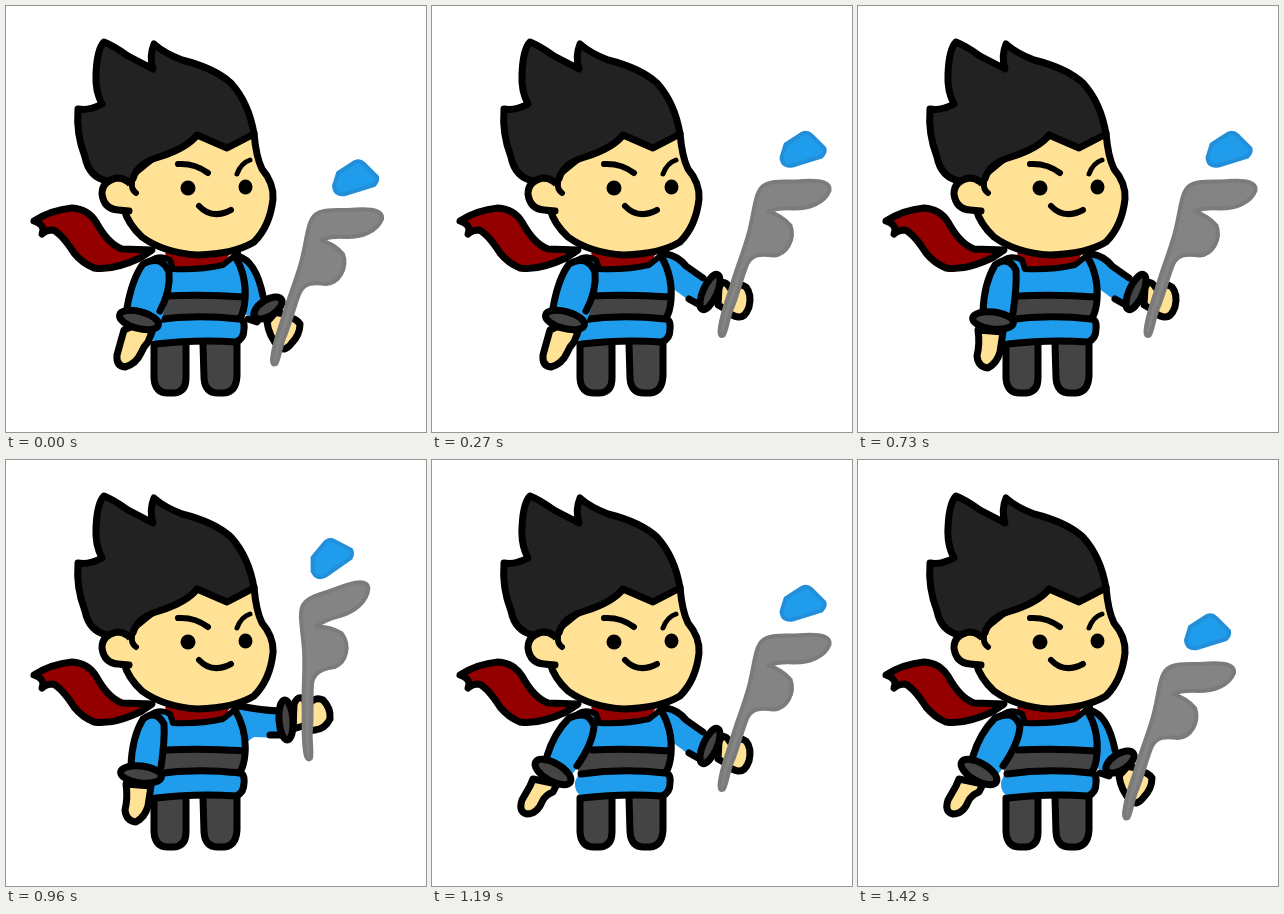
Write an HTML page that moves like this. It is 420 px wide and 426 px high and loops after 1.69 s.

```html
<!DOCTYPE html>
<html lang="en">
<head>
<meta charset="utf-8">
<title>Hero with a staff</title>
<style>
html, body { margin: 0; width: 100%; height: 100%; overflow: hidden; background: #fff; }
svg { display: block; width: 420px; height: 426px; }
.ink { stroke: #000; stroke-width: 7; stroke-linecap: round; stroke-linejoin: round; }
.line { fill: none; }
.skin { fill: #ffe296; }
.blue { fill: #209cec; }
.dark { fill: #444; }
.hair { fill: #222; }
.red { fill: #940000; }
.bare { stroke: none; }
.pose { visibility: hidden; }
.staff { fill: #848484; stroke: #7b7b7b; stroke-width: 4; stroke-linejoin: round; }
.gem { fill: #209cec; stroke: #218fd9; stroke-width: 4; stroke-linejoin: round; }
</style>
</head>
<body>
<svg viewBox="0 0 420 426">
  <defs>
    <g id="weapon">
      <path class="staff" d="M266 354C267 338 276 317 279 305C285 285 294 264 297 248C301 231 302 215 309 209C316 203 330 204 340 204C355 203 378 201 376 213C371 226 355 231 341 231Q324 230 315 234Q328 238 337 248C342 262 333 277 320 278C307 276 299 277 294 286C288 300 284 319 278 332C274 343 273 354 270 358Q266 360 266 354Z"/>
      <path class="gem" d="M328 180L332 167L349 156Q354 154 358 158L371 171Q372 175 368 179L339 188Q329 190 328 180Z"/>
    </g>
  </defs>

  <g id="right">
    <g class="pose">
      <path class="blue bare" d="M227 250L238 252Q251 264 258 290L246 311L233 306Z"/>
      <path class="ink line" d="M232 250Q250 255 257 290M242 313L251 316"/>
      <path class="ink skin" d="M261 316Q263 331 273 341Q279 346 285 338Q294 329 294 318Q290 312 281 311Q276 306 269 307Z"/>
      <ellipse class="ink dark" cx="262" cy="302" rx="16" ry="8" transform="rotate(-33 262 302)"/>
      <use href="#weapon"/>
    </g>
    <g class="pose">
      <path class="blue bare" d="M228 250L240 251L272 272L267 299L255 293L240 282Z"/>
      <path class="ink line" d="M234 248Q246 250 254 260L271 272M257 293L266 298"/>
      <path class="ink skin" d="M287 282Q291 271 298 282Q307 276 314 281Q320 288 317 301Q313 312 306 311Q299 310 295 304L286 299Z"/>
      <ellipse class="ink dark" cx="278" cy="286" rx="19" ry="7" transform="rotate(-66 278 286)"/>
      <use href="#weapon" transform="translate(21.5 -28.5)"/>
    </g>
    <g class="pose">
      <path class="blue bare" d="M228 247L245 249L276 252L274 278L248 277L238 284Z"/>
      <path class="ink line" d="M234 246Q252 250 274 251M264 275L273 275"/>
      <path class="ink skin" d="M288 244Q294 231 302 245Q309 236 317 240Q325 248 324 259Q319 269 309 270Q301 271 297 266L287 269Z"/>
      <ellipse class="ink dark" cx="280" cy="260" rx="7" ry="20" transform="rotate(-4 280 260)"/>
      <use href="#weapon" transform="translate(35 -59) rotate(-17.5 268 358)"/>
    </g>
  </g>

  <g id="body">
    <path class="ink dark" d="M148 338L148 372Q149 387 162 387L168 387Q180 386 180 372L180 338"/>
    <path class="ink dark" d="M197 338L198 372Q199 387 212 387L218 387Q230 386 231 370L231 338"/>
    <path class="blue bare" d="M150 252H228Q240 275 239 298L236 334L151 337Q142 333 143 322L147 313L150 290Z"/>
    <path class="dark bare" d="M147 291H239V302L235 312L146 314Z"/>
    <path class="ink line" d="M160 290Q198 288 238 291M149 314Q190 308 233 313Q239 313 238 323Q238 333 230 336Q192 333 150 338M229 250Q241 270 239 294Q238 306 234 312"/>
    <path class="red bare" d="M159 247H224L218 259L166 264Z"/>
    <path class="ink line" style="stroke-width:6" d="M144 255Q154 248 164 254L167 263Q196 264 217 259L232 247"/>
  </g>

  <g id="left">
    <g class="pose">
      <path class="ink skin" d="M118 324Q114 338 111 349Q110 360 119 361Q130 358 135 347Q138 340 142 336L146 326L133 317Z"/>
      <path class="blue bare" d="M121 305Q126 275 137 258Q157 247 163 269Q165 290 154 317Z"/>
      <path class="ink line" d="M121 302Q126 273 137 258Q155 248 163 266Q165 284 154 305"/>
      <ellipse class="ink dark" cx="133" cy="314" rx="20" ry="8.5" transform="rotate(15 133 314)"/>
    </g>
    <g class="pose">
      <path class="ink skin" d="M120 324Q122 338 119 350Q120 361 130 362Q139 357 142 346L145 326Z"/>
      <path class="blue bare" d="M125 309Q126 280 136 261Q149 247 158 264Q159 285 156 315Z"/>
      <path class="ink line" d="M125 306Q126 277 137 259Q150 249 158 264Q159 280 155 307"/>
      <ellipse class="ink dark" cx="135" cy="314.5" rx="20.5" ry="8.5" transform="rotate(7 135 314.5)"/>
    </g>
    <g class="pose">
      <path class="ink skin" d="M101 319L98 326L90 340Q86 352 95 354Q105 354 110 342Q113 335 121 332L125 324Z"/>
      <path class="blue bare" d="M112 300Q122 271 137 258Q158 249 162 270Q161 289 138 317Z"/>
      <path class="ink line" d="M115 296Q122 273 137 258Q156 249 162 266Q161 283 145 306"/>
      <ellipse class="ink dark" cx="121" cy="312" rx="20" ry="9" transform="rotate(30 121 312)"/>
    </g>
  </g>

  <path id="scarf" class="ink red" d="M28 215Q45 204 66 202Q82 203 90 216Q102 238 116 243L146 244L134 252Q106 265 88 262Q76 257 68 247Q56 228 47 224Q40 224 36 228Q40 219 28 215Z"/>

  <g id="head">
    <path class="ink skin" d="M248 127Q250 151 256 163Q268 177 267 193Q264 220 248 236Q228 248 192 249Q158 247 136 231Q122 218 118 203L125 170L180 125Z"/>
    <path class="ink hair" d="M101 175Q83 171 79 151Q70 128 72 103Q83 105 96 98Q89 85 90 68Q91 43 98 36Q108 40 122 50L147 63Q143 50 148 38Q158 47 176 54Q208 62 225 77Q243 97 248 128L221 142L191 129Q181 142 153 151Q128 158 126 178Z"/>
    <path class="ink skin" d="M129 187Q124 172 111 172Q96 175 96 188Q98 203 112 204L123 205"/>
    <path class="skin bare" d="M119 182L133 173L140 205L124 200Z"/>
    <path class="ink line" style="stroke-width:6" d="M126 177Q125 183 130 187M116 205H123"/>
    <ellipse cx="182" cy="182" rx="7.5" ry="7.5"/>
    <ellipse cx="239.5" cy="181" rx="7" ry="7.5"/>
    <path class="ink line" style="stroke-width:6" d="M172 158Q189 157 202 167M193 200Q206 214 225 204"/>
    <path class="ink line" style="stroke-width:5" d="M231 168Q235 157 244 154"/>
  </g>
</svg>
<script>
const LOOP = 1690;
// start time in ms, pose index
const tracks = {
  right: [[0, 0], [270, 1], [500, 2], [730, 1], [960, 2], [1190, 1], [1420, 0]],
  left: [[0, 0], [500, 1], [1060, 2]]
};
const poses = id => [...document.querySelectorAll(`#${id} > .pose`)];
const limbs = Object.keys(tracks).map(id => ({ steps: tracks[id], parts: poses(id) }));
const start = performance.now();

function draw(now) {
  const time = Math.max(0, now - start) % LOOP;
  for (const { steps, parts } of limbs) {
    const active = steps.filter(([at]) => at <= time).pop()[1];
    parts.forEach((part, i) => { part.style.visibility = i === active ? "visible" : "hidden"; });
  }
  requestAnimationFrame(draw);
}
draw(start);
</script>
</body>
</html>
```
